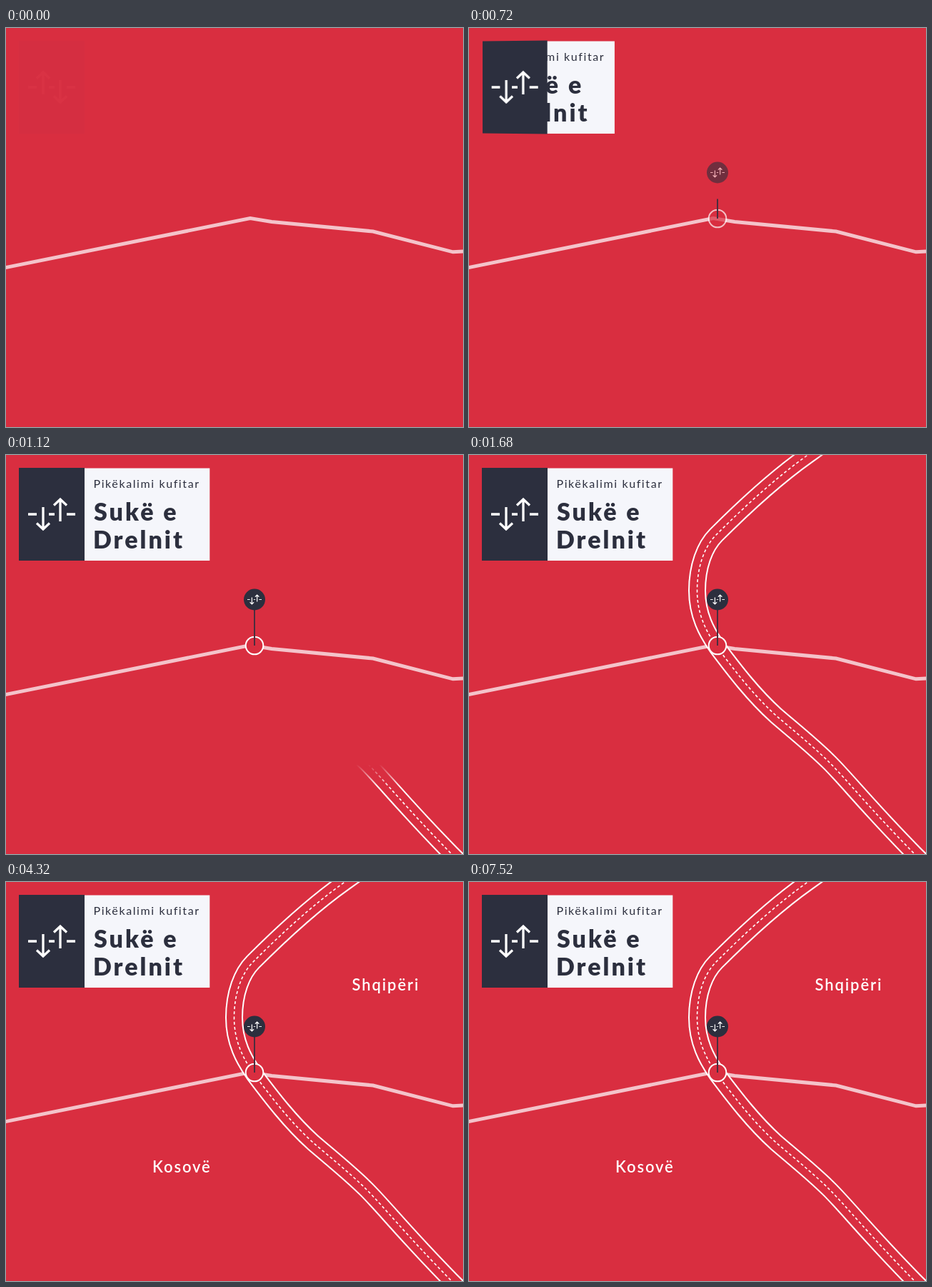
Write an HTML page that moves like this. It is 640 px wide and 559 px high and loops after 8 s.

```html
<!DOCTYPE html>
<html lang="sq">
<head>
<meta charset="utf-8">
<title>Pikëkalimi kufitar</title>
<style>
  html, body { margin: 0; width: 100%; height: 100%; overflow: hidden; background: #d92e40; }
  svg { position: absolute; display: block; }
  #map { left: 0; top: 0; }
  #panel { left: 18px; top: 18px; background: #2c2f3e; }
  text { font-family: Lato, "Open Sans", sans-serif; }
  .kicker { font-size: 16px; letter-spacing: 1.6px; fill: #2c2f3e; }
  .title { font-size: 34px; font-weight: 900; letter-spacing: 3px; fill: #2c2f3e; }
  .label { font-size: 22px; font-weight: 600; letter-spacing: 1.9px; fill: #fff; }
  .line { fill: none; stroke: #fff; }
</style>
</head>
<body>
<svg id="map" width="640" height="559" viewBox="0 0 640 559">
  <defs>
    <path id="way" d="M502.5 -20L474.5 0C432 30 386 72 346 112C330 128 319.5 156 319.5 190C319.5 224 333 249 348 270C372 302 398 336 430 365C452 384 482 408 505 431C530 456 560 494 624 559L654 589"/>
    <g id="arrows" class="line">
      <path d="M-33 0h12M-4 0h8M21 0h12M-12 -10V20M-21 12.5l9 8.5l9 -8.5M12 10V-20M3 -12.5l9 -8.5l9 8.5"/>
    </g>
    <linearGradient id="feather" x1="0" y1="0" x2="0" y2="1">
      <stop offset="0" stop-color="#000"/>
      <stop offset=".05" stop-color="#fff"/>
    </linearGradient>
    <mask id="wipe" maskUnits="userSpaceOnUse" x="0" y="0" width="640" height="559">
      <rect id="front" width="640" height="640" fill="url(#feather)"/>
    </mask>
    <clipPath id="slot"><rect x="109" y="0" width="300" height="200"/></clipPath>
  </defs>

  <rect width="640" height="559" fill="#d92e40"/>
  <path d="M-4 336.3L342 266.5L372 271.5L514 285L626 313.8L644 312.8" fill="none" stroke="#f4c3ca" stroke-width="5"/>

  <g mask="url(#wipe)" fill="none">
    <use href="#way" stroke="#fff" stroke-width="25"/>
    <use href="#way" stroke="#d92e40" stroke-width="21"/>
    <use href="#way" stroke="#fff" stroke-width="1.6" stroke-dasharray="4 3.2"/>
  </g>

  <text class="label" id="north" x="484.5" y="152">Shqipëri</text>
  <text class="label" id="south" x="205" y="407">Kosovë</text>

  <circle id="ring" cx="348" cy="267" r="12.3" fill="#d92e40" stroke="#fff" stroke-width="2"/>
  <path id="stem" fill="none" stroke="#4a2d3e" stroke-width="2"/>
  <g id="pin">
    <circle cx="348" cy="202.5" r="15" fill="#2c2f3e"/>
    <use href="#arrows" transform="translate(348 202.5) scale(.303)" stroke-width="4"/>
  </g>

  <g clip-path="url(#slot)">
    <g id="card">
      <rect x="109" y="18.5" width="176.3" height="129.5" fill="#f5f6fb"/>
      <text class="kicker" x="122.5" y="46">Pikëkalimi kufitar</text>
      <text class="title" x="123" y="92">Sukë e</text>
      <text class="title" x="122" y="131">Drelnit</text>
    </g>
  </g>
</svg>
<svg id="panel" width="92" height="130" viewBox="-46 -65 92 130">
  <use href="#arrows" stroke-width="3.3"/>
</svg>

<script>
  const LOOP = 8000;
  const el = id => document.getElementById(id);
  const [panel, card, ring, stem, pin, front, north, south] =
    ['panel', 'card', 'ring', 'stem', 'pin', 'front', 'north', 'south'].map(el);

  const span = (t, from, to) => Math.min(1, Math.max(0, (t - from) / (to - from)));
  const inOut = p => p < .5 ? 4 * p ** 3 : 1 - 4 * (1 - p) ** 3;
  const ease = (t, from, to) => inOut(span(t, from, to));
  const fade = (node, value) => node.setAttribute('opacity', value);

  function draw(t) {
    const turn = 180 * (ease(t, -40, 960) - 1);
    panel.style.transform = `perspective(1000px) rotateY(${turn}deg)`;
    panel.style.opacity = span(t, -8, 400);

    card.setAttribute('transform', `translate(${-177 * (1 - ease(t, 310, 1110))} 0)`);

    fade(ring, span(t, 360, 880));
    fade(pin, span(t, 400, 930));
    const grow = ease(t, 400, 1020);
    stem.setAttribute('d', `M348 267V${267 - 50 * grow}`);
    fade(stem, grow > 0 ? 1 : 0);

    front.setAttribute('y', Math.max(-40, 559 - .82 * (t - 968)));

    fade(north, ease(t, 1840, 2500));
    fade(south, ease(t, 2100, 2760));
  }

  const start = performance.now();
  function tick() {
    draw((performance.now() - start) % LOOP);
    requestAnimationFrame(tick);
  }
  draw(0);
  requestAnimationFrame(tick);
</script>
</body>
</html>
```
